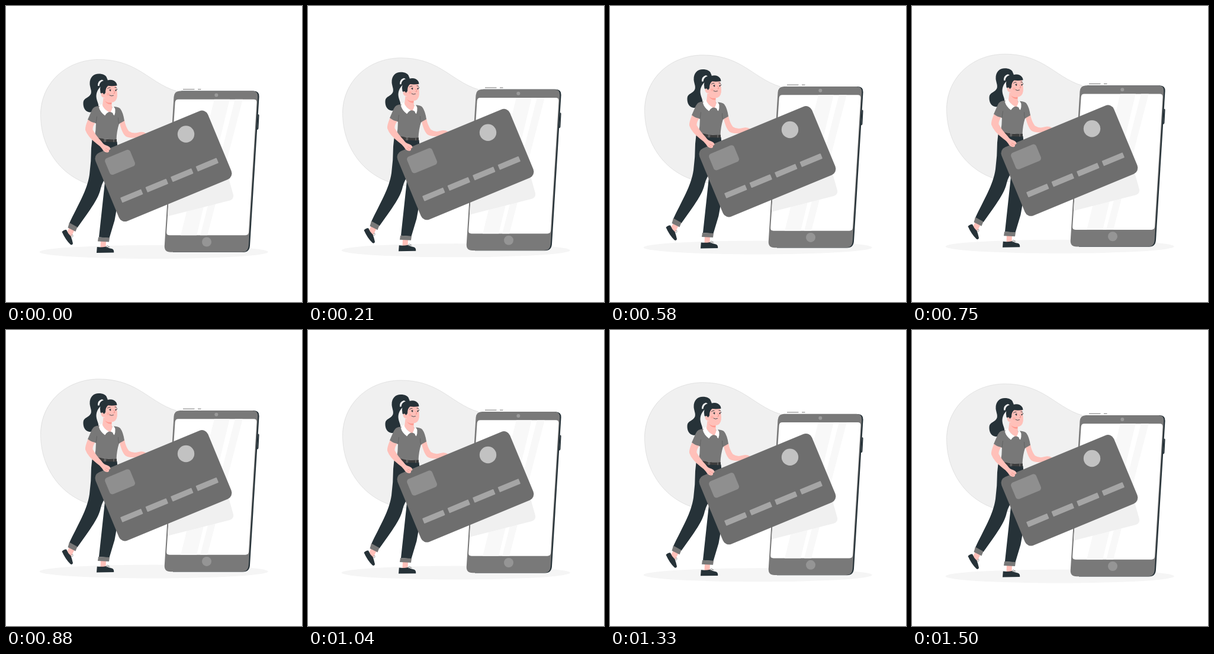
Recreate the animation shown at these times as an HTML page. Size 500 by 500 pixels, loop 1540 ms.

```html
<!DOCTYPE html>
<html lang="en">
<head>
<meta charset="utf-8">
<title>Floating card payment</title>
<style>
  html, body { margin: 0; width: 100%; height: 100%; overflow: hidden; background: #fff; }
  svg { display: block; width: 100vw; height: 100vh; }
  .dark { fill: #263238; }
  .skin { fill: #ffc0b9; }
  .cloth { fill: #787878; }
  .line { fill: none; stroke-linecap: round; stroke-linejoin: round; }
</style>
</head>
<body>
<svg viewBox="0 0 500 500">
  <defs>
    <clipPath id="screenClip"><path id="screenShape" d="M291 157.800H418.500Q423.800 157.800 423.500 163L410 382Q409.600 387.200 404.500 387.200H276Q270.800 387.200 271.200 382L285.600 163Q286 157.800 291 157.800Z"/></clipPath>
  </defs>
  <g id="scene">
    <path fill="#f0f0f0" stroke="#bbb" stroke-width=".35" d="M58.500 184C58.500 130 102 90.400 157 90.400C185 90.400 206 98 224 108.500C244 120 264 137 288 143.800L300 250C270 300 215 309 170 306.500C105 303 58.500 250 58.500 184Z"/>
    <ellipse cx="249.700" cy="415.500" rx="193" ry="11.500" fill="#f5f5f5"/>

    <!-- phone -->
    <path class="dark" d="M296 143.600H418.500Q428 144 427.600 153L412 405Q411 416 400.500 416H282Z"/>
    <path class="dark" d="M425.500 183H426.500Q427.800 183.500 427.600 185L426.400 207Q426.200 209 424 209Z"/>
    <path fill="#797979" d="M294 143.500H416.500Q425.900 143.500 425.300 153.500L409.800 404.500Q409 415.800 398.500 415.800H278Q267 415.800 267.800 404.500L283.500 153.500Q284.300 143.500 294 143.500Z"/>
    <path fill="#777" d="M299 140.200H318.500V141.200H299ZM324 140.200H329.500V141.200H324Z"/>
    <use href="#screenShape" fill="#fff"/>
    <g clip-path="url(#screenClip)">
      <path fill="#f8f8f8" d="M352 157H378L322 388H295ZM387 157H400L340 388H328Z"/>
      <path fill="#f0f0f0" d="M260 280L373 280L384 319Q385 326 378 328.500L272 355.500H260Z"/>
    </g>
    <circle cx="355.300" cy="150.400" r="3" fill="#9a9a9a"/>
    <circle cx="339" cy="398.500" r="8" fill="#959595"/>

    <!-- legs and shoes -->
    <path class="skin" d="M107 374L116 378L110 390L102 384ZM160 396H169L168.500 409H159.500Z"/>
    <path class="dark" d="M94.500 381.500Q98 377.500 102 378Q104.500 384.500 109.500 389Q111.500 394 113 401Q112.500 404.500 109 403Q100.500 395 94.500 381.500Z"/>
    <path class="dark" d="M153.800 407Q161 408 169 406.500Q174 409.500 179.500 410.200Q182.600 411.500 182.200 416.600L153 417Z"/>
    <path class="line" stroke="#777" stroke-width=".7" d="M169 407Q171 403 172.500 405.500T170 408M171 408Q175 404 175 407.500M110 388Q113 384.500 113 388T110.500 390"/>
    <path class="dark" d="M163 229H187.500Q196 300 183.500 362L174.500 392L157 390.500L167 298Z"/>
    <path class="dark" d="M145.500 226H187Q186 262 172 285Q163 296 160 308C157 322 150 334 120.500 374.500L106.500 368C122 335 137 312 141 285Q144 262 144 240Z"/>
    <path class="cloth" d="M107 366L120.500 373.500L117.500 381L104.500 374.500ZM156 390.500L175 391.500L174 398.500L155 397.500Z"/>

    <!-- hair behind the head -->
    <path class="dark" d="M141.500 132C141 120 148.500 114.500 156.500 114.500C164 114.500 169.500 117 170.500 122C172.500 125 172 128 170 131L160 136C154.500 141 152.500 147 152.500 153C153 161 158 167 155.500 171C151 173.500 149 180 141 179.500C134 178.500 130 172 130.500 163C131 155 141 155 143.500 148C145 143 142 138 141.500 132Z"/>
    <path fill="#f2f2f2" d="M155 135Q154.500 126.500 162 124.500L165 126Q158 128 157.500 135Z"/>

    <!-- far arm -->
    <path class="skin" d="M191 193L200 193Q202 204 207.500 211.500Q215 216.500 224 213.500Q231 211.500 236.500 215Q231 219 224 221.500Q210 224.500 202 220Q195 214 191 193Z"/>

    <!-- neck and shirt -->
    <path class="cloth" d="M157 169Q148 169 145 176Q141 185 138 192Q145 198 152 198Q152 210 149.500 223L186.500 226Q187 211 191 199L200 194Q198 180 193 173.500Q190 170 181 170Z"/>
    <path class="skin" d="M164.500 155L179 160Q178 168 179.500 171.500Q182 177 177.500 180Q172 181 163 169Z"/>
    <path fill="#ff9a90" d="M167 160Q171 164.500 178.500 163L178.200 166Q171 167 167 160Z"/>
    <path fill="#fff" d="M161.500 165.500Q166 175 174 179Q170 182 167 185Q159 179 157 171.500Q158 167 161.500 165.500ZM179.500 168.500Q184 171 184.500 175Q185 180 183 185Q179 182 177 178.500Q180 174 179.500 168.500Z"/>
    <path class="cloth" d="M168 184Q173.500 176 180.500 181L182 188H168Z"/>
    <path class="line" stroke="#555" stroke-width=".6" d="M152 198L153.500 187M191 199Q189 195 189.500 189"/>
    <path fill="#3d3d3d" d="M150 221.500Q168 226 187 225L186.800 230Q166 230 148.800 226.500Z"/>
    <path class="line" stroke="#8a8a8a" stroke-width=".9" d="M166.500 224.500L166 229.500M168.500 224.700L168 229.500M182 225.500V229.500"/>

    <!-- head -->
    <path class="skin" d="M165 133Q174 126 185.500 133Q188.500 145 187.800 153Q186.500 162.500 178 163Q170 163 166.500 155Q161 154.500 160.500 149.500Q160.800 145.500 165 147Z"/>
    <path class="dark" d="M159.500 146.500Q157 133 165 127.500Q175 123 182 126Q187.500 129 187.500 134.500Q179 135.800 172.500 134.800Q168 138 168 146.500L165.500 149.500Q163 145 161 148Z"/>
    <g class="line" stroke="#263238" stroke-width=".9">
      <path d="M171.500 139.500Q173.500 137.500 176 138M184 137.500Q186 137.300 187 138.500M185.500 142L188 140.800M174.500 142L177 141"/>
      <path d="M175 150.800Q178 153 181.500 151.200" stroke-width=".8"/>
    </g>
    <path class="line" stroke="#ed847e" stroke-width=".8" d="M182 143Q184.500 146 183.500 147.300L181.800 147.500"/>
    <ellipse cx="176.300" cy="142.800" rx=".95" ry="1.300" class="dark"/>
    <ellipse cx="185.400" cy="142.600" rx=".9" ry="1.300" class="dark"/>
    <circle cx="172.500" cy="149" r="2.300" fill="#ff9a90" opacity=".45"/>

    <!-- card -->
    <g transform="translate(266 270.300) rotate(-22.500)">
      <rect x="-102.800" y="-62.500" width="205.500" height="125" rx="11" fill="#6e6e6e"/>
      <rect x="-88.400" y="-49" width="46" height="30" rx="5" fill="#8f8f8f"/>
      <g id="bars" fill="#a5a5a5"></g>
    </g>
    <circle cx="304" cy="216.500" r="14.200" fill="#c2c2c2"/>

    <!-- near arm -->
    <path class="skin" d="M138.500 192Q144 196.500 150.500 197.500Q146 204 146.500 209Q152 219 162 229.500Q165 234.500 171 236Q176.500 238 176.500 242L174 243.500Q174.500 247.500 171 247.500Q165 247 162.500 241.500Q159 236.500 153 232.500Q138 221 134 209.500Q133.300 204 138.500 192Z"/>
    <path class="line" stroke="#ed847e" stroke-width=".6" d="M168.500 240.500Q171.500 241.500 174 243.500M167.500 243L171 246"/>
  </g>
</svg>
<script>
  const PERIOD = 1540, LEAD = 40, RISE = 10, BASE = 0.5;
  const scene = document.getElementById("scene");

  document.getElementById("bars").innerHTML = [0, 1, 2, 3].map(i =>
    `<rect x="${-88 + i * 46}" y="21.500" width="38" height="9.400" rx="1"/>`).join("");

  // Linear rise and fall.
  function draw(time) {
    const phase = ((time + LEAD) % PERIOD) / PERIOD;
    const lift = RISE * (1 - Math.abs(1 - 2 * phase));
    scene.setAttribute("transform", `translate(0 ${(BASE - lift).toFixed(3)})`);
  }

  let start;
  function tick(now) {
    start ??= now;
    draw(now - start);
    requestAnimationFrame(tick);
  }
  draw(0);
  requestAnimationFrame(tick);
</script>
</body>
</html>
```
